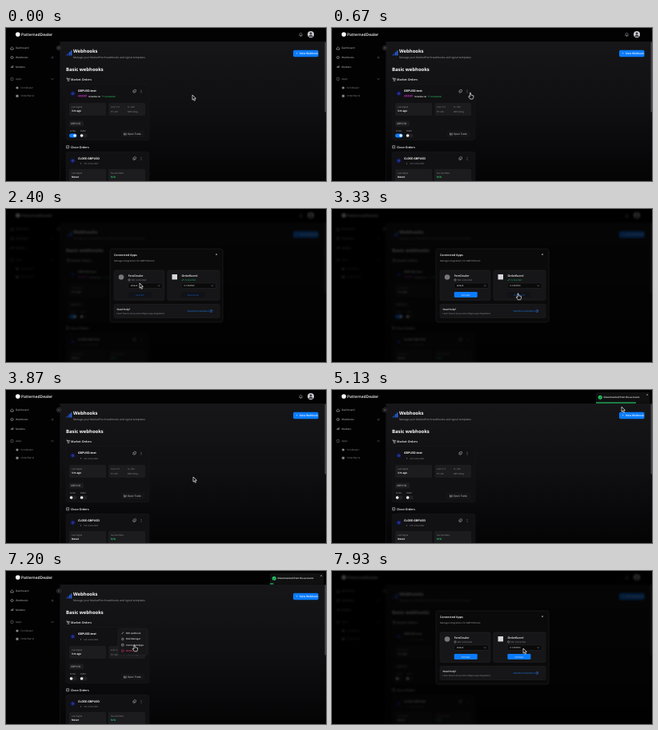
Recreate the animation shown at these times as an HTML page with a canvas. Size 400 px wide and 192 px high, loop 8000 ms.

```html
<!DOCTYPE html>
<html lang="en">
<head>
<meta charset="utf-8">
<title>Webhooks</title>
<style>
html, body { margin: 0; width: 100%; height: 100%; overflow: hidden; background: #000; }
canvas { display: block; width: 400px; height: 192px; }
</style>
</head>
<body>
<canvas id="stage" width="400" height="192"></canvas>
<script>
const W = 400, H = 192, LOOP = 8000;
const stage = document.getElementById('stage').getContext('2d');
const pageCanvas = document.createElement('canvas');
pageCanvas.width = W;
pageCanvas.height = H;
const page = pageCanvas.getContext('2d');
let c = page;

const WHITE = '#fafafa', DIM = '#98989c', BLUE = '#0b7cff', GREEN = '#25c866', LINE = '#1b1b1e';
const PANEL = '#1c1c1f';
const BROKER = 'FernDealer', PLATFORM = 'OrderBarrel';

const clamp = v => Math.max(0, Math.min(1, v));
const smooth = v => v * v * (3 - 2 * v);
const ramp = (t, from, to) => smooth(clamp((t - from) / (to - from)));
const within = (t, from, to) => t >= from && t < to;

function text(str, x, y, size, color = WHITE, weight = 500, align = 'left') {
  c.font = `${weight} ${size}px "Open Sans", "Noto Sans", sans-serif`;
  c.textRendering = 'geometricPrecision';
  c.textAlign = align;
  c.textBaseline = 'alphabetic';
  c.fillStyle = color;
  c.fillText(str, x, y + size * 0.36);
}

function box(x, y, w, h, r, fill, stroke) {
  c.beginPath();
  c.roundRect(x, y, w, h, r);
  if (fill) { c.fillStyle = fill; c.fill(); }
  if (stroke) { c.strokeStyle = stroke; c.lineWidth = 0.5; c.stroke(); }
}

function dot(x, y, r, fill, stroke) {
  c.beginPath();
  c.arc(x, y, r, 0, Math.PI * 2);
  if (fill) { c.fillStyle = fill; c.fill(); }
  if (stroke) { c.strokeStyle = stroke; c.lineWidth = 0.6; c.stroke(); }
}

function path(points, color, width = 0.6) {
  c.beginPath();
  points.forEach(([x, y]) => c.lineTo(x, y));
  c.strokeStyle = color;
  c.lineWidth = width;
  c.stroke();
}

const chevron = (x, y, color = DIM) => path([[x - 1.2, y - 0.6], [x, y + 0.6], [x + 1.2, y - 0.6]], color);

function cross(x, y, r, color = '#ccc') {
  path([[x - r, y - r], [x + r, y + r]], color, 0.5);
  path([[x + r, y - r], [x - r, y + r]], color, 0.5);
}

function backdrop() {
  c.fillStyle = '#020203';
  c.fillRect(0, 0, W, H);
  const fade = c.createLinearGradient(0, 17, 0, H);
  fade.addColorStop(0, '#161618');
  fade.addColorStop(0.5, '#0f0f11');
  fade.addColorStop(1, '#040405');
  c.fillStyle = fade;
  c.fillRect(68, 17, W - 68, H - 17);
  path([[67.5, 17], [67.5, H]], '#1b1b1e', 0.5);
  box(398.6, 17.5, 1.2, 88, 0.6, '#55555a');
}

function header() {
  dot(14.8, 8, 2.8, WHITE);
  text('PatternedDealer', 19, 8, 4.9, WHITE, 600);
  path([[366.8, 9.5], [367.3, 7], [368.5, 6], [369.7, 7], [370.2, 9.5], [366.8, 9.5]], '#a4a4a8');
  dot(368.5, 10.3, 0.5, '#a4a4a8');
  dot(381, 8, 4, '#d0d1d4');
  dot(381, 6.8, 1.5, '#44454b');
  c.beginPath();
  c.arc(381, 11, 2.6, Math.PI, 0);
  c.fill();
}

function sidebar() {
  const ink = '#c4c4c7', faint = '#88888c';
  path([[5.8, 25.5], [7.5, 23.7], [9.2, 25.5], [9.2, 27], [5.8, 27], [5.8, 25.5]], ink);
  text('Dashboard', 12, 25, 3.2, ink);
  dot(7.5, 37, 1.5, null, ink);
  text('Webhooks', 12, 37, 3.2, ink);
  dot(58, 37, 1.5, '#2a2a2e');
  for (let i = 0; i < 3; i++) path([[6.2 + i * 1.3, 50], [6.2 + i * 1.3, 48.5 - i * 0.7]], ink);
  text('Markets', 12, 48.5, 3.2, ink);
  box(6, 62.5, 3, 3, 0.5, null, faint);
  text('Apps', 12, 64, 3.2, faint);
  chevron(58, 64);
  dot(14, 75, 1.6, faint);
  text(BROKER, 18.5, 75, 3, faint);
  box(12.5, 83.8, 3, 3, 0, faint);
  text(PLATFORM, 18.5, 85.4, 3, faint);
  dot(66, 25, 2.7, '#111113', '#44444a');
  path([[66.5, 24], [65.5, 25], [66.5, 26]], WHITE, 0.5);
}

function stat(x, y, label, value, color = WHITE) {
  box(x, y, 46, 16, 1.5, PANEL);
  text(label, x + 3, y + 5, 2.7, DIM);
  text(value, x + 3, y + 10.3, 3.1, color, 700);
}

function cardHead(y, title) {
  dot(83.5, y + 3, 3.8, '#10132a');
  dot(83.5, y + 3, 2, '#233090');
  text(title, 90, y, 3.6, WHITE, 700);
  box(158.8, y - 0.7, 2.6, 2.6, 0.5, null, '#bbb');
  box(159.9, y - 1.8, 2.6, 2.6, 0.5, '#111113', '#bbb');
  for (let i = -1; i < 2; i++) dot(169, y + 0.3 + i * 1.5, 0.4, '#ccc');
}

function notConnected(y) {
  dot(93.5, y, 0.6, DIM);
  text('not connected', 97, y, 2.7, DIM);
}

function toggle(x, label, on) {
  text(label, x + 1, 129, 2.5, '#c0c0c4');
  box(x, 132.5, 9.5, 5, 2.5, on ? BLUE : '#202024');
  dot(x + (on ? 7 : 2.6), 135, 1.8, WHITE);
}

function cards(connected) {
  const fill = '#111113';
  box(75, 70.5, 104, 70, 2.5, fill, LINE);
  cardHead(79.2, 'GBPUSD-test');
  if (connected) {
    box(89.5, 83.6, 12, 4, 1, '#2a0f2b');
    text('ACCOUNT', 90.3, 85.6, 2.2, '#e04be0', 700);
    text(PLATFORM, 103, 85.6, 2.6, WHITE, 600);
    dot(121, 85.7, 0.6, GREEN);
    text('connected', 123, 85.6, 2.7, GREEN, 600);
  } else notConnected(85.8);
  stat(79, 94, 'Last Signal', '3 m ago');
  box(128.5, 94, 45.5, 16, 1.5, PANEL);
  text('Lots: 0.11', 131, 99, 2.6, DIM);
  text('SL: 200', 152, 99, 2.6, DIM);
  text('TP: 200', 131, 105, 2.6, DIM);
  text('BE/Trailing', 152, 105, 2.6, DIM);
  box(79, 116.5, 18, 7, 1.2, PANEL);
  text('GBPUSD', 81, 120, 3.1, '#d0d0d4');
  toggle(79, 'Active', connected);
  toggle(92, 'Public', false);
  box(143.5, 128.5, 30, 8.5, 1.3, '#151517');
  for (let i = 0; i < 3; i++) path([[147.6 + i * 1.2, 134.5], [147.6 + i * 1.2, 131.5 + i % 2]], '#ccc');
  text('Open Trade', 152, 133, 3.1, '#dcdce0');

  box(75, 155.5, 104, 50, 2.5, fill, LINE);
  cardHead(163.6, 'CLOSE-GBPUSD');
  notConnected(170);
  stat(79, 177, 'Last Signal', 'Never');
  stat(128, 177, 'Success Rate', 'N/A', GREEN);
}

function content(connected) {
  for (let i = 0; i < 4; i++) {
    c.fillStyle = i < 2 ? '#1d49b8' : '#2c67ee';
    c.fillRect(75.6 + i * 1.8, 33 - i * 1.6, 1.3, 1.5 + i * 1.6);
  }
  text('Webhooks', 84, 29.3, 5.9, WHITE, 700);
  text('Manage your MarketPorch webhooks and signal templates', 84, 36.8, 3.3, '#a8a8ac');
  box(359, 27.8, 31.5, 8.4, 1.6, BLUE);
  text('+', 362.5, 32, 3.5, WHITE, 600);
  text('New Webhook', 367, 32, 3.3, WHITE, 600);
  text('Basic webhooks', 75, 52.2, 5.9, WHITE, 700);
  path([[75.5, 62.8], [76.3, 62.8], [77, 65], [79, 65], [79.4, 63.4], [76.5, 63.4]], '#ddd');
  dot(77.2, 66.2, 0.5, '#ddd');
  dot(78.8, 66.2, 0.5, '#ddd');
  text('Market Orders', 81, 64.3, 3.7, WHITE, 600);
  box(75.5, 147.5, 3.2, 3.6, 0.5, null, '#ddd');
  path([[76.3, 149.3], [77, 150], [78, 148.7]], '#ddd', 0.5);
  text('Close Orders', 81, 149.2, 3.7, WHITE, 600);
  cards(connected);
}

function menu() {
  box(140, 72.5, 37, 33, 2, '#17171a', '#28282c');
  ['Edit webhook', 'Risk Manager', 'Connected Apps', 'Delete'].forEach((label, i) => {
    const y = 78 + i * 7.4, color = i === 3 ? '#f0365a' : '#e6e6ea';
    if (i === 0) path([[144.5, y + 1.2], [147, y - 1.3]], color);
    else box(144.6, y - 1.2, 2.4, 2.4, i === 1 ? 1.2 : 0.4, null, color);
    text(label, 150, y, 2.8, color, 600);
  });
}

function appCard(x, w, name, account, linked, filled) {
  box(x, 77, w, 37.5, 2, '#161618', '#252528');
  const left = x + 17.7;
  text(name, left, 83.3, 3.5, WHITE, 600);
  const color = linked ? GREEN : DIM;
  if (linked) path([[left + 0.3, 89], [left + 1.1, 89.9], [left + 2.5, 88]], color);
  else dot(left + 1.3, 89, 1.2, null, color);
  text(linked ? 'Connected' : 'Not connected', left + 4, 89, 2.7, color);
  box(left, 92.8, 43, 6.8, 1.2, '#0a0a0b', '#2c2c30');
  text(account, left + 3, 96.2, 2.7, WHITE);
  chevron(left + 38.5, 96.2);
  box(left, 104, 29, 7, 1.2, '#101217');
  c.save();
  c.globalAlpha *= filled;
  box(left, 104, 29, 7, 1.2, BLUE);
  c.restore();
  const ink = filled > 0.5 ? WHITE : '#1767cf';
  text(linked ? 'Disconnect' : 'Connect', left + 14.5, 107.6, 2.8, ink, 500, 'center');
}

function modal(linked, leftFill) {
  box(130, 50, 141, 92, 2.5, '#0a0a0b', '#242427');
  text('Connected Apps', 135, 58, 3.7, WHITE, 600);
  text('Manage integrations for GBPUSD-test', 135, 64.6, 2.9, '#a8a8ac');
  cross(263, 57, 1);
  appCard(135, 63, BROKER, 'default', false, leftFill);
  appCard(201.7, 65.5, PLATFORM, 'E-1204563', linked, linked ? 0 : 1);
  dot(144, 85.5, 3.3, '#77777b');
  box(207.5, 82, 6.5, 6.5, 0, '#d8d8dc');
  box(135, 119.5, 132.2, 17, 2, '#161618', '#252528');
  text('Need help?', 138.5, 126, 3.1, WHITE, 600);
  text('Learn how to set up and configure app integrations', 138.5, 131.4, 2.5, '#a8a8ac');
  text('View Documentation', 226.5, 128, 2.8, '#2086ff');
  box(255, 126.9, 2.4, 2.4, 0.3, null, '#2086ff');
  path([[256.2, 128.1], [258, 126.3]], '#2086ff', 0.5);
}

function toast(t) {
  const shown = ramp(t, 3870, 4200);
  if (!shown || t > 7400) return;
  c.save();
  c.globalAlpha = shown;
  c.translate(0, (shown - 1) * 5);
  box(330, 2.8, 67, 14, 1.5, '#101011');
  dot(335.2, 9.3, 2.5, GREEN);
  path([[334.1, 9.4], [334.9, 10.2], [336.4, 8.4]], '#0c1a10');
  text('Disconnected from the account.', 339.5, 9.4, 2.95, WHITE, 600);
  cross(394, 6, 0.8);
  c.fillStyle = GREEN;
  c.fillRect(330, 15.4, 66 * clamp((7400 - t) / 3000), 1.2);
  c.restore();
}

const CURSOR = [
  [0, 233, 84], [70, 229, 84], [330, 174, 82], [470, 174, 82], [800, 171.5, 81],
  [1070, 171.5, 81], [1200, 171.5, 80], [1700, 171.5, 80], [2000, 160, 93],
  [2150, 160, 93], [2400, 167, 93], [2870, 168, 93], [3300, 232, 106], [3670, 234, 108],
  [3870, 234, 109], [4150, 234, 109], [4600, 345, 48], [5130, 362, 21], [5470, 362, 22],
  [5950, 170, 84], [6130, 168.5, 82], [6700, 169, 82], [7000, 160, 93], [7250, 160, 93],
  [7800, 239, 97], [LOOP, 239, 97]
];

function cursorAt(t) {
  const i = CURSOR.findIndex(k => k[0] > t);
  const [t0, x0, y0] = CURSOR[i - 1], [t1, x1, y1] = CURSOR[i];
  const p = ramp(t, t0, t1);
  return [x0 + (x1 - x0) * p, y0 + (y1 - y0) * p];
}

function cursor(t) {
  const [x, y] = cursorAt(t);
  const hand = within(t, 300, 2130) || within(t, 3230, 3680) || within(t, 5930, 7230);
  const outline = hand
    ? [[0, 0], [1, 0], [1.4, 2.8], [4.6, 3.6], [4.4, 6], [3.6, 7.8], [0.4, 7.8], [-1.8, 4.6], [-1, 4], [0, 4.8]]
    : [[0, 0], [0, 6.2], [1.4, 5], [2.4, 7.3], [3.5, 6.8], [2.5, 4.6], [4.4, 4.4]];
  c.save();
  c.translate(x, y);
  c.beginPath();
  outline.forEach(([px, py]) => c.lineTo(px, py));
  c.closePath();
  c.fillStyle = '#111';
  c.strokeStyle = '#f0f0f0';
  c.lineWidth = 0.7;
  c.fill();
  c.stroke();
  c.restore();
}

function render(t) {
  const firstOpen = ramp(t, 2070, 2330) * (1 - ramp(t, 3690, 3840));
  const open = Math.max(firstOpen, ramp(t, 7200, 7450));
  c = page;
  backdrop();
  header();
  sidebar();
  content(t < 3680);
  if (within(t, 1590, 2120) || within(t, 6600, 7220)) menu();
  toast(t);

  c = stage;
  c.drawImage(pageCanvas, 0, 0);
  if (open > 0) {
    c.save();
    c.globalAlpha = open;
    c.filter = 'blur(1px)';
    c.drawImage(pageCanvas, 0, 0);
    c.filter = 'none';
    c.fillStyle = 'rgba(0,0,0,.77)';
    c.fillRect(0, 0, W, H);
    modal(t < 3500, t < 5000 ? ramp(t, 2450, 2650) : 1);
    c.restore();
  }
  cursor(t);
}

function tick(now) {
  render(now % LOOP);
  requestAnimationFrame(tick);
}
render(0);
requestAnimationFrame(tick);
</script>
</body>
</html>
```
